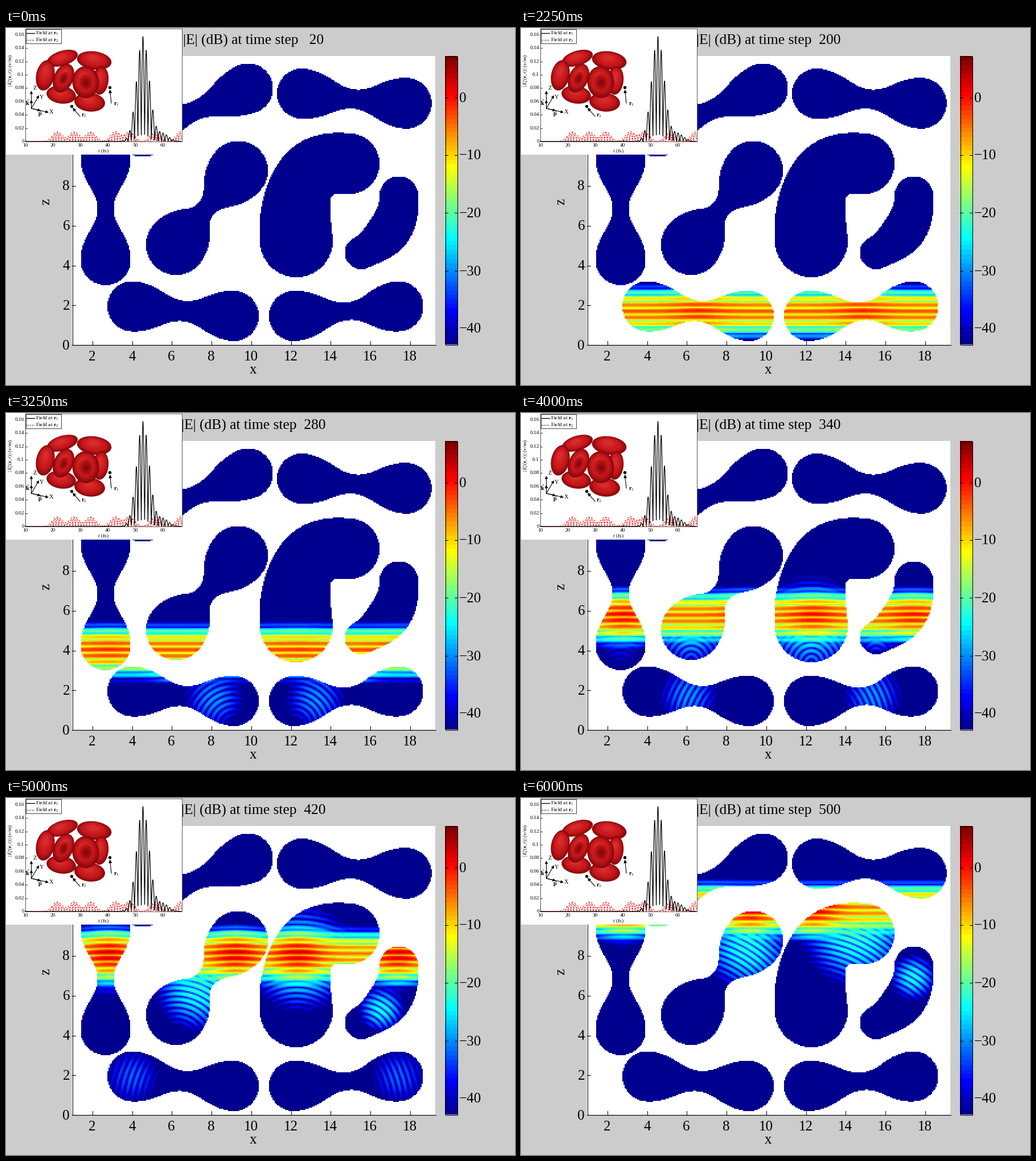
A matplotlib script that plays this animation: 894x626 px, repeating every 6.25 s.

```python
import numpy as np
import matplotlib.pyplot as plt
from matplotlib.animation import FuncAnimation
from matplotlib.patches import Ellipse, Rectangle

W, H, DPI = 894, 626, 100
PX = 72 / DPI
L, R, T, B = 116, 754, 49, 555
CELL = 2
DB_MIN, DB_MAX = -42.9, 7.1
RED = "#f01818"
DASH = (0, (2.2, 1.4))

plt.rcParams.update({
    "font.family": "Liberation Serif",
    "mathtext.fontset": "custom",
    "mathtext.rm": "Liberation Serif",
    "mathtext.it": "Liberation Serif:italic",
    "mathtext.bf": "Liberation Serif:bold",
})

fig = plt.figure(figsize=(W / DPI, H / DPI), dpi=DPI, facecolor="#cccccc")
ax = fig.add_axes([0, 0, 1, 1])
ax.set_axis_off()


def text(x, y, s, size, ha="center", z=4, **kw):
    return ax.text(x, y, s, fontsize=size * PX, ha=ha, va="center", zorder=z, **kw)


def line(xs, ys, width=1, color="k", z=4, **kw):
    ax.plot(xs, ys, color=color, lw=width * PX, zorder=z, **kw)


def rect(x0, y0, x1, y1, fill, edge="none", z=1):
    ax.add_patch(Rectangle((x0, y0), x1 - x0, y1 - y0, fc=fill, ec=edge,
                           lw=PX, zorder=z))


def image(data, x0, x1):
    return ax.imshow(data, extent=(x0, x1, B, T), interpolation="nearest",
                     aspect="auto", zorder=1)


# 64-step jet scale
v = np.arange(1, 65)[:, None] / 64
JET = np.clip(1.5 - np.abs(4 * v - [3, 2, 1]), 0, 1)

gx, gy = np.meshgrid(np.arange(L, R, CELL) + CELL / 2,
                     np.arange(T, B, CELL) + CELL / 2)


class Blob:
    """Discs swept along a quadratic curve, from the lower lobe to the upper one."""

    def __init__(self, low, mid, high, radii, focus=None, wake=-29):
        self.ends = np.array([low, mid, high], float)
        self.radii = radii
        self.wake = wake
        self.mask = np.zeros(gx.shape, bool)
        for t in np.linspace(0, 1, 80):
            cx, cy = self.centre(t)
            self.mask |= np.hypot(gx - cx, gy - cy) < self.radius(t)
        self.x, self.y = gx[self.mask], gy[self.mask]
        self.bottom = self.y.max()
        self.focus = focus or self.centre(.5)[0]

    def centre(self, t):
        a, b, c = self.ends
        return (1 - t) ** 2 * a + 2 * t * (1 - t) * b + t * t * c

    def radius(self, t):
        low, waist, high = self.radii
        u = (2 * t - 1) ** 2
        return waist + ((low if t < .5 else high) - waist) * u * (2 - u)

    def pulse(self, n):
        """Main wave packet: climbs at a steady rate, focuses and spreads inside."""
        front = 650 - 1.017 * n
        d = self.y - front - 50
        grow = np.clip((self.bottom - front - 50) / 140, 0, 1)
        lens = grow * np.exp(-((self.x - self.focus) / 45) ** 2)
        spread = np.where(d > 0, 1 + .5 * grow, 1)
        return (-3 + 8 * lens - 2.5 * grow - .0155 * d ** 2 / spread
                + ripple(d + 3 * lens, 11.3, .09))

    def echo(self, n):
        """Fainter rings that trail the pulse along the blob's own axis."""
        passed = (650 - self.bottom) / 1.017
        t = (n - passed - 150) / 150
        cx, cy = self.centre(np.clip(t, 0, 1))
        size = 1.15 * self.radii[0]
        fade = 150 * max(abs(t - .5) - .5, 0) ** 2
        ox, oy = self.ends[0] + [0, self.radii[0]]
        rings = np.hypot(self.x - ox, self.y - oy) - n
        off = np.hypot(self.x - cx, self.y - cy) / size
        return self.wake - 12 * off ** 2 - fade + ripple(rings, 10, .04)

    def colours(self, n):
        total = 10 ** (self.pulse(n) / 10) + 10 ** (self.echo(n) / 10)
        level = (10 * np.log10(total + 1e-9) - DB_MIN) / (DB_MAX - DB_MIN)
        return JET[np.clip(level * 64, 0, 63).astype(int)]


def ripple(u, period, floor):
    return 10 * np.log10(np.cos(np.pi * u / period) ** 2 + floor)


blobs = [
    Blob((400, 505), (313, 496), (222, 488), (44, 18, 44)),
    Blob((506, 505), (602, 497), (689, 488), (44, 15.5, 44)),
    Blob((175, 407), (175, 317), (175, 227), (44, 14, 44), 181, -36),
    Blob((299, 380), (350, 318), (408, 250), (53, 17, 52), 403, -22),
    Blob((510, 373), (495, 225), (603, 238), (64, 55, 53), 513, -21),
    Blob((624, 394), (693, 360), (690, 294), (29, 38, 34), 688, -23),
    Blob((240, 182), (332, 146), (425, 106), (44, 17, 44)),
    Blob((703, 132), (613, 126), (520, 115), (44.5, 17, 44)),
]


def field(n):
    img = np.ones(gx.shape + (3,))
    for b in blobs:
        img[b.mask] = b.colours(n)
    return img


# main axes and colour bar
picture = image(field(20), L, R)
image(JET[::-1, None], 771, 793)
ax.set_xlim(0, W)
ax.set_ylim(H, 0)

line([L + .5, L + .5], [T, B + .5])
line([L, R + 1], [B + .5, B + .5])
for k in range(2, 19, 2):
    x = round(L + (k - 1) * 34.87) + .5
    line([x, x], [B, B - 6])
    text(x, 577, str(k), 25)
for k in range(0, 9, 2):
    y = round(B - k * 34.87) + .5
    line([L, L + 6], [y, y])
    text(112, y + 2, str(k), 25, "right")
text(434, 600, "x", 25)
text(70, 304, "z", 25, rotation=90)
title = text(435, 22.5, "", 25.5)

rect(771.5, T + .5, 792.5, B + .5, "none", "k", 2)
for k in range(0, -41, -10):
    y = round(121 - k * 10.12) + .5
    line([771, 776], [y, y])
    line([788, 793], [y, y])
    text(796, y + 2, str(k).replace("-", "\u2212"), 25, "left")

# inset plot
IZ = 10
rect(0, 0, 309, 222, "white", z=IZ)
rect(34, .5, 308.5, 199, "none", "#555555", IZ + 1)
for k in range(9):
    y = 199 - k * 23.4
    line([34, 37], [y, y], .8, z=IZ + 1)
    text(32, y, f"{k * .02:.2g}", 9.5, "right", IZ + 1)
for k in range(6):
    x = 34 + k * 48.3
    line([x, x], [199, 196], .8, z=IZ + 1)
    text(x, 206, str(10 + 10 * k), 9.5, z=IZ + 1)
text(171, 216, r"$\mathit{t}$ (fs)", 9.5, z=IZ + 1)
text(8, 74, r"$|\,\mathit{E}_z^s(\mathbf{r},\mathit{t})\,|$ (v/m)", 9.5,
     z=IZ + 1, rotation=90)


def bump(x, c, w, h):
    return h * np.exp(-((x - c) / w) ** 2)


xs = np.linspace(34, 308, 1600)
near = (bump(xs, 240.5, 15.5, .157) + bump(xs, 275, 15, .012)) \
    * np.sqrt(np.cos(np.pi * (xs - 240.5) / 5.9) ** 2 + .004)
far = sum(bump(xs, c, 12, .015) for c in (90, 120, 149, 192, 217, 262, 307)) \
    * np.abs(np.cos(np.pi * (xs - 149) / 4.9))
line(xs, 199 - far * 1170, 1.2, RED, IZ + 2, ls=DASH)
line(xs, 199 - near * 1170, 1.2, z=IZ + 3)

rect(35, 2, 96.5, 27, "white", "#444444", IZ + 3)
for k, col, style in [(1, "k", "-"), (2, RED, DASH)]:
    y = 12 * k - 3
    line([36, 50], [y, y], 1.3, col, IZ + 4, ls=style)
    text(52, y, rf"Field at $\mathbf{{r}}_{k}$", 9.5, "left", IZ + 4)


def disc(x, y, w, h, angle, z, dimple=0):
    """Shaded red cell built from nested ellipses."""
    dark, red, light = np.array([(135, 8, 12), (200, 24, 27), (228, 62, 60)]) / 255
    a = np.radians(angle)
    turn = np.array([[np.cos(a), -np.sin(a)], [np.sin(a), np.cos(a)]])

    def layer(scale, shift, color):
        at = (x, y) + turn @ (np.array(shift) * (w, h))
        ax.add_patch(Ellipse(at, w * scale, h * scale, angle=angle, fc=color,
                             ec="none", zorder=z))

    for k in np.linspace(0, 1, 14):
        shade = dark + (red - dark) * min(1, k * 2.5)
        if k > .5:
            shade = red + (light - red) * (k - .5)
        layer(1 - .75 * k, (-.05 * k, -.15 * k), shade)
    if dimple:
        for k in np.linspace(0, 1, 10):
            layer(dimple * (1 - .75 * k), (.02, .02), red + (dark - red) * k)


cells = [(97, 117, 52, 31, 8), (147, 130, 54, 33, 6), (99, 53, 56, 26, -17),
         (155, 57, 61, 32, 8), (69, 83, 32, 54, 12), (166, 92, 28, 50, 6),
         (101, 88, 34, 53, 24, .5), (140, 95, 47, 56, -4, .55)]
for i, (x, y, w, h, angle, *dimple) in enumerate(cells):
    disc(x, y, w, h, angle, IZ + 4 + i * .1, *dimple)


def arrow(x0, y0, x1, y1, size=7):
    ax.annotate("", (x1, y1), (x0, y0), zorder=IZ + 6,
                arrowprops=dict(arrowstyle="-|>", color="k", lw=1.1 * PX,
                                mutation_scale=size, shrinkA=0, shrinkB=0))


for tip in [(44.5, 110), (58, 118), (75, 148), (44.5, 126), (61, 145)]:
    arrow(44.5, 141, *tip)
arrow(185, 132, 182.5, 108, 8)
arrow(130, 155, 117, 140, 8)
line([182, 114.5], [104, 136.5], z=IZ + 6, marker="o", ms=4 * PX, ls="none")
for x, y, s in [(51, 106, "Z"), (63, 122, "Y"), (80, 148, "X"),
                (38, 131, r"$\mathbf{\hat{k}}$"), (60, 151, r"$\mathbf{\hat{p}}$"),
                (194, 134, r"$\mathbf{r}_1$"), (137, 154, r"$\mathbf{r}_2$")]:
    text(x, y, s, 10.5, z=IZ + 6)


def update(i):
    n = 20 * (i + 1)
    picture.set_data(field(n))
    title.set_text(f"|E| (dB) at time step {n:4d}")
    return picture, title


anim = FuncAnimation(fig, update, frames=25, interval=250, repeat=True,
                     repeat_delay=0, blit=False)
plt.show()
```
